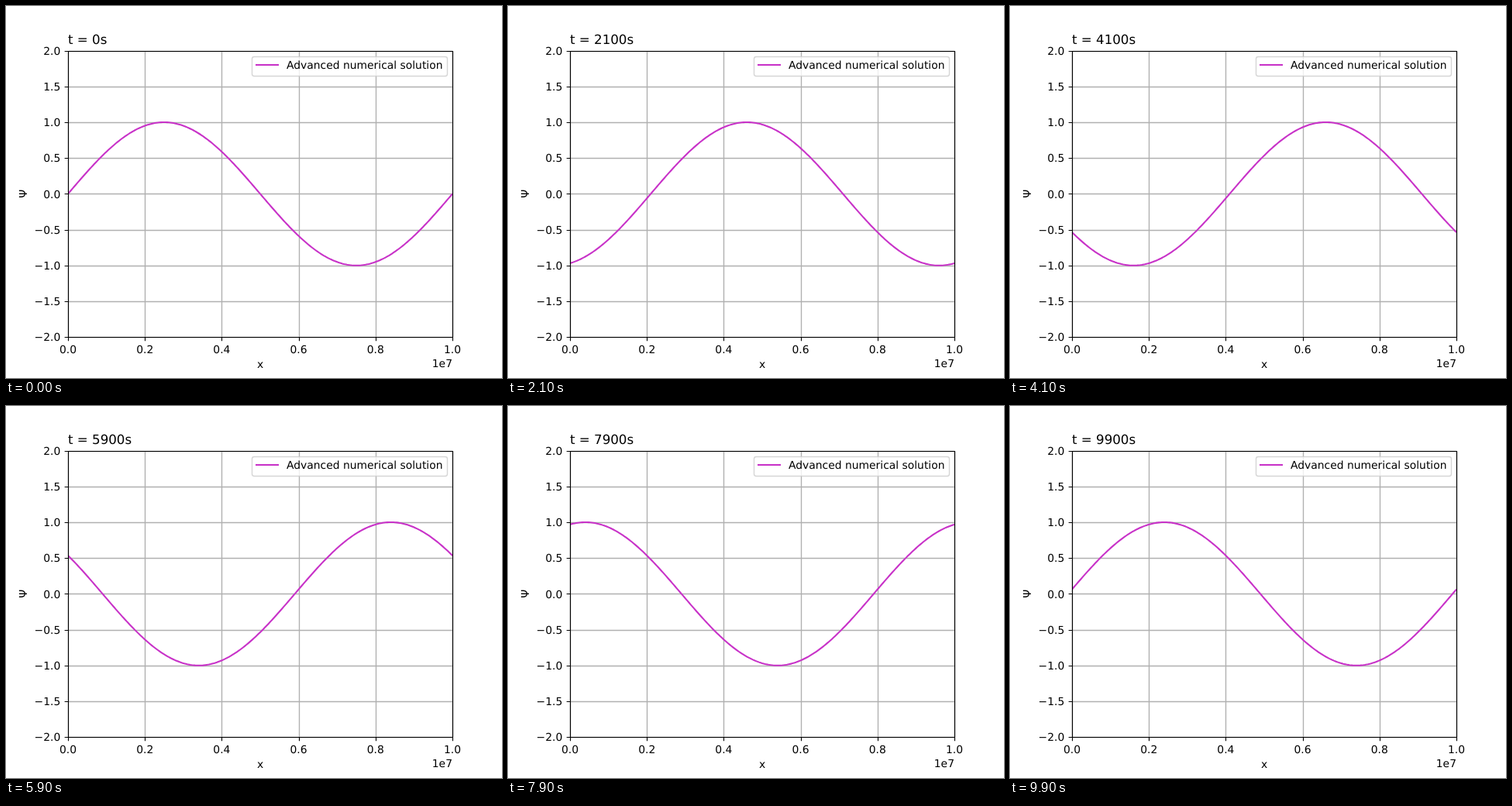
Write an HTML page that moves like this. It is 640 by 480 pixels and loops after 10000 ms.

```html
<!DOCTYPE html>
<html lang="en">
<head>
<meta charset="utf-8">
<title>Travelling wave</title>
<style>
html, body { margin: 0; width: 100%; height: 100%; overflow: hidden; background: #fff; }
svg { display: block; width: 640px; height: 480px; }
text { font: 13.89px "DejaVu Sans", sans-serif; fill: #000; text-rendering: geometricPrecision; }
.title { font-size: 16.67px; }
.end { text-anchor: end; }
.mid { text-anchor: middle; }
path, line { fill: none; }
#grid { stroke: #b0b0b0; stroke-width: 1.39; }
#frame { stroke: #000; stroke-width: 1.11; }
.wave { stroke: #c832c8; stroke-width: 2.08; stroke-linejoin: round; }
</style>
</head>
<body>
<svg viewBox="0 0 640 480">
  <clipPath id="area"><rect x="80" y="57.6" width="496" height="369.6"/></clipPath>
  <path id="grid"/>
  <path id="wave" class="wave" clip-path="url(#area)"/>
  <path id="frame"/>
  <g id="labels"></g>
  <text id="title" class="title" x="80" y="49"></text>
  <text class="mid" x="328" y="467">x</text>
  <text class="end" x="576" y="466">1e7</text>
  <text class="mid" transform="translate(27 242.4) rotate(-90)">Ψ</text>
  <rect x="317.5" y="65.5" width="252" height="25" rx="2.8" fill="#fff" fill-opacity=".8" stroke="#ccc" stroke-opacity=".8" stroke-width="1.39"/>
  <line class="wave" x1="322" y1="76" x2="352" y2="76"/>
  <text x="362" y="81">Advanced numerical solution</text>
</svg>
<script>
const LEFT = 80, TOP = 57.6, WIDTH = 496, HEIGHT = 369.6;
const MIDDLE = TOP + HEIGHT / 2, UNIT = HEIGHT / 4;
const LOOP = 10000, STEP = 100;
const byId = id => document.getElementById(id);
const snap = v => Math.floor(v + 0.5) + 0.5;

function addLabel(text, x, y, anchor) {
  const label = document.createElementNS("http://www.w3.org/2000/svg", "text");
  label.setAttribute("class", anchor);
  label.setAttribute("x", x);
  label.setAttribute("y", y);
  label.textContent = text;
  byId("labels").append(label);
}

function drawAxes() {
  const right = snap(LEFT + WIDTH), bottom = snap(TOP + HEIGHT);
  const left = snap(LEFT), top = snap(TOP);
  let grid = "";
  let frame = `M${left} ${top}H${right}V${bottom}H${left}Z`;
  for (let i = 0; i <= 5; i++) {
    const x = LEFT + WIDTH * i / 5;
    grid += `M${snap(x)} ${top}V${bottom}`;
    frame += `M${snap(x)} ${bottom}v4.86`;
    addLabel((i / 5).toFixed(1), x, 448, "mid");
  }
  for (let i = 0; i <= 8; i++) {
    const y = TOP + HEIGHT * i / 8;
    grid += `M${left} ${snap(y)}H${right}`;
    frame += `M${left} ${snap(y)}h-4.86`;
    addLabel((2 - i / 2).toFixed(1).replace("-", "−"), 70.3, Math.round(y + 5.2), "end");
  }
  byId("grid").setAttribute("d", grid);
  byId("frame").setAttribute("d", frame);
}

function render(ms) {
  const seconds = Math.floor(ms % LOOP / STEP) * STEP;
  const points = Array.from({ length: 249 }, (_, i) => {
    const u = i / 248;
    const psi = Math.sin(2 * Math.PI * (u - seconds / LOOP));
    return `${(LEFT + WIDTH * u).toFixed(2)} ${(MIDDLE - UNIT * psi).toFixed(2)}`;
  });
  byId("wave").setAttribute("d", "M" + points.join("L"));
  byId("title").textContent = `t = ${seconds}s`;
}

drawAxes();
const start = performance.now();
function tick() {
  render(performance.now() - start);
  requestAnimationFrame(tick);
}
tick();
</script>
</body>
</html>
```
